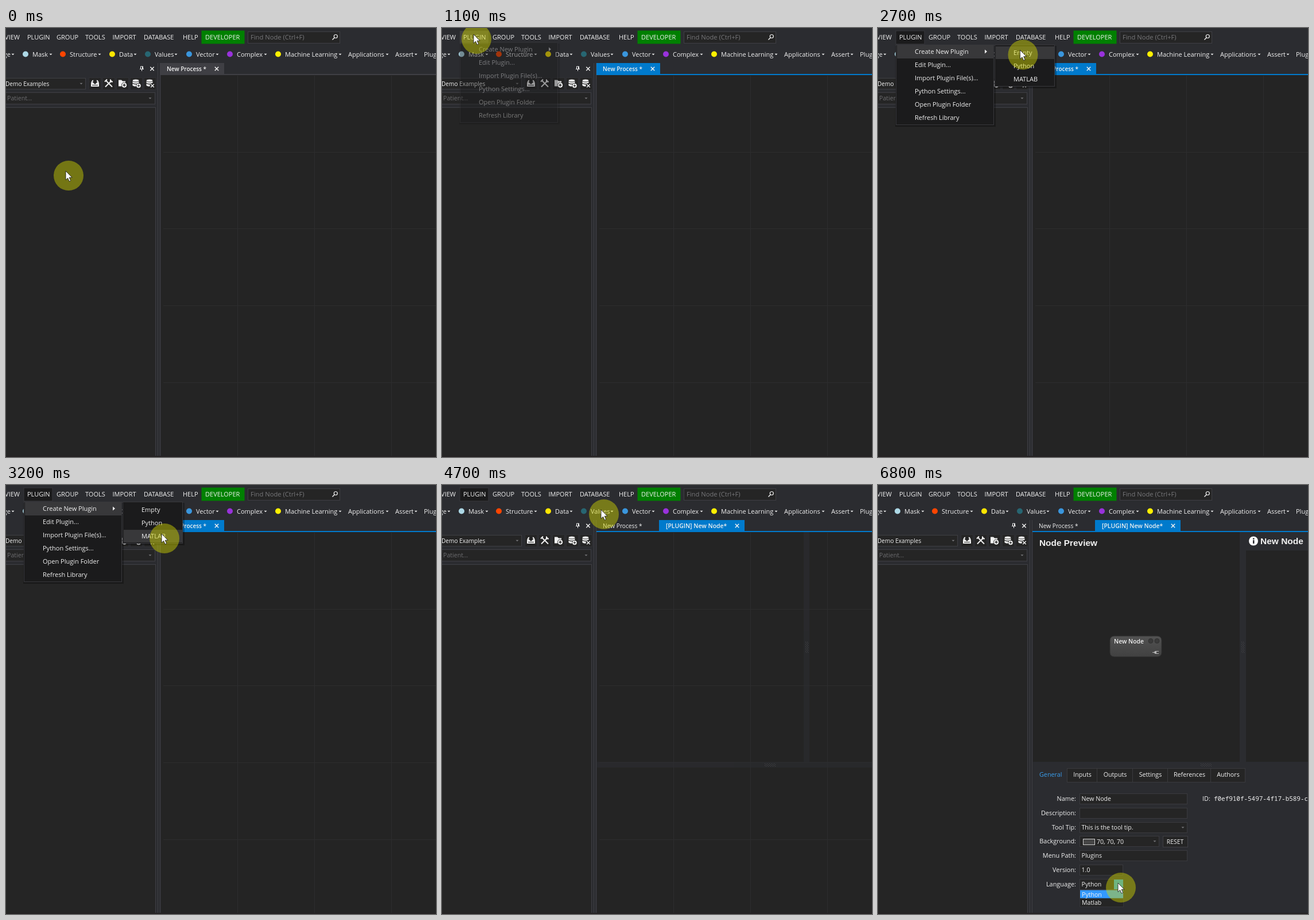
An HTML page for the animation above (6.9 s loop, 749 px wide and 747 px high).

```html
<!DOCTYPE html>
<html lang="en">
<head>
<meta charset="utf-8">
<title>Creating a plugin node</title>
<style>
  html, body { margin: 0; width: 100%; height: 100%; overflow: hidden; background: #2b2c30; }
  svg { display: block; width: 749px; height: 747px; }
  text { font-family: "Open Sans", "Noto Sans", sans-serif; white-space: pre; }
  .title { font-family: "Liberation Sans", Arial, sans-serif; font-weight: 700; }
  .mono { font-family: "Noto Sans Mono", "DejaVu Sans Mono", monospace; }
</style>
</head>
<body>
<svg id="stage" viewBox="0 0 749 747" xmlns="http://www.w3.org/2000/svg"></svg>
<script>
const LOOP = 6900, STEP = 100;
const CHROME = '#2b2c30', PANEL = '#252525', LINE = '#3f3f44', BLUE = '#007acc', WHITE = '#f1f1f1', MENU = '#1b1b1c';

const text = (x, y, s, { size = 11, fill = WHITE, anchor = 'start', weight = 400, cls = '' } = {}) =>
  `<text x="${x}" y="${y}" font-size="${size}" fill="${fill}" text-anchor="${anchor}" font-weight="${weight}" class="${cls}">${s}</text>`;
const rect = (x, y, w, h, fill, extra = '') =>
  `<rect x="${x}" y="${y}" width="${w}" height="${h}" fill="${fill}" ${extra}/>`;
const box = (x, y, w, h, fill, stroke = LINE) =>
  rect(x + .5, y + .5, w - 1, h - 1, fill, `stroke="${stroke}"`);
const path = (d, fill, extra = '') => `<path d="${d}" fill="${fill}" ${extra}/>`;
const stroke = (d, color = WHITE, width = 1.5) => path(d, 'none', `stroke="${color}" stroke-width="${width}"`);
const circle = (x, y, r, fill, extra = '') => `<circle cx="${x}" cy="${y}" r="${r}" fill="${fill}" ${extra}/>`;
const caret = (x, y, fill = WHITE, r = 2.5) => path(`M${x - r},${y - r / 2}h${2 * r}l${-r},${r}z`, fill);
const cross = (x, y, r = 3.2) => stroke(`M${x - r},${y - r}l${2 * r},${2 * r}m0,${-2 * r}l${-2 * r},${2 * r}`);
const group = (id, body) => `<g id="${id}">${body}</g>`;
const at = (x, y, body) => `<g transform="translate(${x} ${y})">${body}</g>`;

function topBar() {
  const names = [[37, 'PLUGIN'], [88, 'GROUP'], [138, 'TOOLS'], [185.5, 'IMPORT'], [240, 'DATABASE'], [308, 'HELP']];
  return box(421, 6, 161, 21, PANEL) + text(426, 20, 'Find Node (Ctrl+F)', { size: 11.2, fill: '#77777a' })
    + stroke('M572,17l-3.500,3.500') + circle(574.3, 14.5, 3, 'none', `stroke="${WHITE}" stroke-width="1.2"`)
    + rect(340.5, 4.5, 75, 23, '#008000') + text(347, 20, 'DEVELOPER')
    + group('pluginButton', rect(31, 5, 50, 23, 'none'))
    + text(24, 20, 'VIEW', { anchor: 'end' }) + names.map(([x, s]) => text(x, 20, s)).join('');
}

function toolBar() {
  const items = [[46, 'Mask', 78, '#add8e6'], [111, 'Structure', 163, '#ff4500'], [197, 'Data', 225, '#ffe600'],
    [259, 'Values', 296, '#276672'], [331, 'Vector', 368, '#3a96dd'], [402, 'Complex', 452, '#9932dc'],
    [486, 'Machine Learning', 582, '#fff000'], [596, 'Applications', 664], [678, 'Assert', 714]];
  return text(8, 50, 'Image', { anchor: 'end' }) + caret(12, 46) + text(728, 50, 'Plugins')
    + items.map(([x, s, arrow, dot]) => text(x, 50, s) + caret(arrow, 46) + (dot ? circle(x - 12, 45.5, 5, dot) : '')).join('');
}

function panelIcons() {
  const database = '<ellipse cx="-1" cy="-5" rx="5.5" ry="2"/><path d="M-6.500,-3.500q5.500,3 11,0v2.500q-5.500,3 -11,0z M-6.500,0.300q5.500,3 11,0v3.500q-5.500,3 -11,0z"/>';
  const badge = circle(4, 4, 4.5, PANEL);
  const icons = [
    path('M-7,0q1,-6 4,-6v3h-2l5,4.500 5,-4.500h-2v-3q3,0 4,6v5.500h-14z', WHITE) + rect(-5, 2.5, 10, 1, PANEL),
    stroke('M-6,6L5,-5M-5,-5L6,6', WHITE, 2) + stroke('M-7,-3l4,-4M3,-7v4h4', WHITE, 2),
    path('M-7,-6h5l2,2h5v9h-12z', WHITE) + circle(3, 3, 5, PANEL) + circle(3, 3, 4.3, WHITE) + stroke('M0.500,3h5M3,0.500v5', PANEL, 1.4),
    `<g fill="${WHITE}">${database}</g>` + badge + circle(4, 4, 3.8, WHITE) + stroke('M1.800,4h4.400M4,1.800v4.400', PANEL, 1.2),
    `<g fill="${WHITE}">${database}</g>` + badge + cross(4, 4, 2.8)
  ];
  return icons.map((icon, i) => box(144 + 24 * i, 86, 22, 22, PANEL, '#303034') + at(155 + 24 * i, 96.5, icon)).join('');
}

function sidePanel() {
  return stroke('M236.500,71v4M233,71.500h7M234.500,71v-4h4v4M237.500,67v4', WHITE, 1) + cross(254.5, 71)
    + box(-5, 87, 144, 20, PANEL) + text(-1, 100.5, 'Demo Examples', { size: 10.1, weight: 500 }) + caret(131, 97, '#77777a')
    + panelIcons()
    + box(-5, 112, 265, 21, PANEL) + text(2, 126, 'Patient...', { size: 10.6, fill: '#6d6d70' }) + caret(251, 122.5, '#77777a')
    + box(-5, 138, 266, 620, PANEL) + rect(264, 61, 1, 686, LINE) + rect(268, 61, 1, 686, LINE);
}

function canvas() {
  let lines = '';
  for (let i = 0; i < 4; i++) {
    if (i < 3) lines += rect(403 + 134 * i, 83, 1, 664, '#2d2d2e');
    lines += rect(274, Math.round(215.5 + 133.8 * i), 475, 1, '#2d2d2e');
  }
  return rect(270, 82, 479, 665, '#242424') + lines;
}

function splitters() {
  let dots = '';
  for (let i = 0; i < 20; i++) {
    const along = (i >> 1) * 2, across = (i & 1) * 3 + (i >> 1) % 2;
    dots += rect(633 + across, 273 + along, 1, 1, '#4a4a4e') + rect(562 + along, 485 + across, 1, 1, '#4a4a4e');
  }
  return group('bars', rect(630, 82, 10, 400, CHROME) + rect(270, 482, 479, 10, CHROME)) + dots;
}

function editor() {
  const edges = [330, 382, 444, 505, 580, 640];
  const tabs = ['Inputs', 'Outputs', 'Settings', 'References', 'Authors'];
  const fields = [['Name', 'New Node', 188], ['Description', '', 188], ['Tool Tip', 'This is the tool tip.', 188, 1],
    ['Background', '', 139, 1], ['Menu Path', 'Plugins', 188], ['Version', '1.0', 76], ['Language', 'Python', 76, 1]];
  const form = fields.map(([label, value, width, arrow], i) => {
    const y = 537 + Math.round(24.8 * i);
    return text(345, y + 13, label + ':', { size: 10.9, anchor: 'end' })
      + box(351, y, width, 19, PANEL, '#3a3a3e') + text(354.5, y + 13, value, { size: 10.6 })
      + (arrow ? caret(351 + width - 8, y + 9.5, '#77777a') : '');
  }).join('');
  const node = rect(404, 263, 90, 36, 'url(#nodeFill)', 'rx="7" stroke="#303030"')
    + text(411, 276, 'New Node', { size: 10.4, weight: 600 })
    + [475, 486].map(x => circle(x, 271.5, 4, '#3a3a3a', 'stroke="#303030"')).join('')
    + path('M478,291h2.500l2.500,-2h2v5h-2l-2.500,-2h-2.500z', '#b4b4b4') + stroke('M485,289.500h4M485,293.500h4', '#b4b4b4', 1);
  return rect(270, 82, 479, 665, CHROME) + rect(270, 82, 360, 400, '#242424') + rect(641, 114, 108, 368, '#242424')
    + text(281, 106, 'Node Preview', { size: 15.4, cls: 'title', weight: 700 })
    + text(666, 103, 'New Node', { size: 15.5, cls: 'title', weight: 700 })
    + circle(654, 97.5, 8, '#fff') + rect(653, 96, 2.5, 6, CHROME) + rect(653, 92.5, 2.5, 2.3, CHROME)
    + node + text(281, 508, 'General', { size: 10.8, fill: '#3a9fee' })
    + tabs.map((s, i) => box(edges[i] - 1, 493, edges[i + 1] - edges[i] + 1, 25, PANEL, '#3a3a3e')
      + text((edges[i] + edges[i + 1]) / 2, 508, s, { size: 10.7, anchor: 'middle' })).join('')
    + form + box(357, 616, 21, 11, '#464646', '#d0d0d0') + text(381, 625, '70, 70, 70', { size: 10.6 })
    + box(496, 611, 44, 20, PANEL) + text(517.5, 625, 'RESET', { size: 10.4, anchor: 'middle' })
    + text(565, 550, 'ID:', { size: 10.8 }) + text(585, 550, 'f0ef910f-5497-4f17-b589-c', { cls: 'mono', size: 10.95 })
    + group('comboHover', rect(411, 687, 16, 17, '#1c97ea') + caret(419, 696));
}

const menuItems = ['Create New Plugin', 'Edit Plugin...', 'Import Plugin File(s)...', 'Python Settings...', 'Open Plugin Folder', 'Refresh Library'];
const subItems = ['Empty', 'Python', 'MATLAB'];
const menuBox = (x, w, h) => rect(x - 1, 31, w + 4, h + 1, '#000', 'opacity=".3"') + box(x, 29, w, h, MENU, '#38383c');

document.getElementById('stage').innerHTML =
  `<defs><linearGradient id="nodeFill" x2="0" y2="1"><stop stop-color="#525252"/><stop offset="1" stop-color="#414141"/></linearGradient></defs>`
  + rect(0, 0, 749, 747, CHROME) + topBar() + toolBar() + sidePanel() + canvas()
  + group('editor', editor()) + group('splitters', splitters())
  + rect(269, 80, 480, 2, LINE, 'id="tabLine"')
  + group('firstTab', rect(269, 61, 111, 20, LINE, 'id="firstTabFill"') + text(280, 74.5, 'New Process *', { size: 10, weight: 600 }) + cross(367, 71))
  + group('secondTab', text(280, 74.5, 'New Process *', { size: 10.2 }) + rect(378, 61, 149, 20, BLUE)
    + text(390, 74.5, '[PLUGIN] New Node*', { size: 10.45, weight: 600 }) + cross(514, 71))
  + rect(0, 745, 749, 2, '#242122')
  + group('menu', menuBox(31, 171, 140) + rect(33, 30, 168, 23, '#38383a', 'id="menuHover"')
    + menuItems.map((s, i) => text(64, 45 + 23 * i, s)).join('') + path('M186,37.500l4,3.500l-4,3.500z', WHITE))
  + group('submenu', menuBox(203, 105, 73) + rect(205, 32, 102, 22, '#38383a', 'id="subHover"')
    + subItems.map((s, i) => text(236, 47 + 23 * i, s)).join(''))
  + group('popup', box(351, 705, 77, 30, PANEL, '#343438') + rect(352, 705.5, 75, 14, '#3399ff')
    + text(355, 716.5, 'Python', { size: 10.6 }) + text(355, 731, 'Matlab', { size: 10.6 }))
  + group('cursor', circle(5, 8, 26, '#d2d600', 'opacity=".46"')
    + path('M0,0V15.500L3.600,12.200L6.100,18L8.700,16.900L6.200,11.200H11z', '#fff', 'stroke="#111" stroke-width=".8"'));

// Pointer tip: time, x, y
const pointerKeys = [[0, 104, 249], [100, 103, 246], [450, 44, 90], [700, 52, 30], [1000, 55, 11], [1400, 55, 11],
  [1800, 80, 40], [2200, 82, 42], [2400, 88, 41], [2800, 277, 38], [3200, 271, 85], [3400, 272, 92],
  [3600, 272, 92], [4100, 277, 43], [4900, 277, 43], [5500, 418, 686], [5700, 418, 686], [5900, 418, 693], [LOOP, 418, 693]];

const clamp = v => Math.min(1, Math.max(0, v));
const ease = v => v * v * (3 - 2 * v);
const el = id => document.getElementById(id);
const show = (id, on) => el(id).setAttribute('display', on ? 'inline' : 'none');

function pointer(t) {
  const i = pointerKeys.findIndex(k => k[0] > t);
  const [t0, x0, y0] = pointerKeys[i - 1], [t1, x1, y1] = pointerKeys[i];
  const p = ease((t - t0) / (t1 - t0));
  return [x0 + (x1 - x0) * p, y0 + (y1 - y0) * p];
}

function update(t) {
  const [x, y] = pointer(t);
  el('cursor').setAttribute('transform', `translate(${x} ${y})`);

  const opened = t >= 1200 && t < 4800;
  const button = el('pluginButton').firstChild;
  button.setAttribute('fill', opened ? MENU : t >= 800 && t < 1200 ? '#3e3e40' : 'none');
  button.setAttribute('stroke', opened ? '#38383c' : 'none');

  const fade = clamp((t - 1000) / 250);
  show('menu', t > 1000 && t < 4400);
  el('menu').setAttribute('opacity', fade);
  el('menu').setAttribute('transform', `translate(0 ${-6.7 * (1 - fade)})`);
  show('menuHover', t > 1400 && y > 30);

  show('submenu', t >= 2000 && t < 4400);
  el('submenu').setAttribute('opacity', clamp((t - 1900) / 250));
  show('subHover', x > 204);
  el('subHover').setAttribute('y', 32 + 23 * Math.min(2, Math.max(0, Math.floor((y - 32) / 23))));

  const plugin = t >= 4600, ready = t >= 4800;
  const tabColor = t >= 1000 ? BLUE : LINE;
  el('tabLine').setAttribute('fill', tabColor);
  el('firstTabFill').setAttribute('fill', tabColor);
  show('firstTab', !plugin);
  show('secondTab', plugin);
  show('splitters', plugin);
  el('bars').setAttribute('opacity', ready ? 1 : .65);
  show('editor', ready);
  show('comboHover', x > 411 && y > 687);
  show('popup', t >= 6100);
}

function frame() {
  update(Math.floor(performance.now() % LOOP / STEP) * STEP);
  requestAnimationFrame(frame);
}
frame();
</script>
</body>
</html>
```
